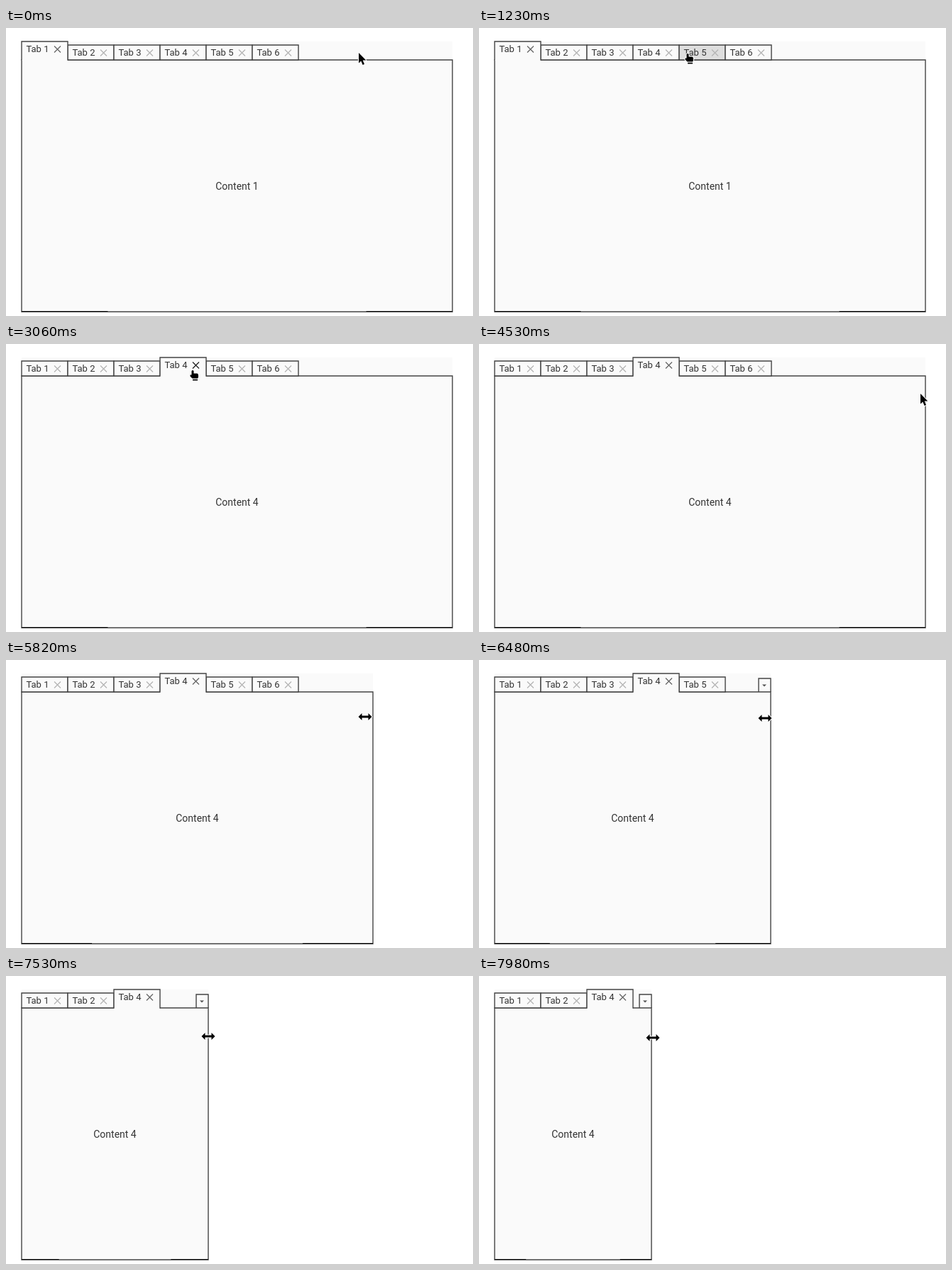
Write an HTML page that moves like this. It is 658 px wide and 406 px high and loops after 8000 ms.

```html
<!DOCTYPE html>
<html>
<head>
<meta charset="utf-8">
<style>
html, body { margin: 0; width: 100%; height: 100%; overflow: hidden; background: #fff; }
svg { display: block; cursor: default; }
text { font-family: Roboto, Arial, sans-serif; font-size: 13px; fill: #333; }
.content { font-size: 14px; text-anchor: middle; }
.line { fill: none; stroke: #444; stroke-width: 1.4; }
.pointer { stroke: #fff; stroke-width: 2; paint-order: stroke; stroke-linejoin: round; }
</style>
</head>
<body>
<svg id="stage" width="658" height="406" viewBox="0 0 658 406"></svg>
<script>
const LOOP = 8000, STEP = 30;
const LEFT = 22, TOP = 45, BOTTOM = 400, TAB = 65, COUNT = 6;
const CLICK = 2850, GRAB = 4860, DRAG = 5340;

// Key points: time, then the eased values
const pointer = [
  [60, 497, 35], [1230, 294, 36], [1700, 195, 37], [2460, 262, 37], [3030, 262, 37],
  [3840, 530, 60], [4650, 627, 72], [4980, 630, 79], [DRAG, 630, 79],
  [5820, 506, 80], [7110, 326, 84], [7980, 245, 87]
];
const edge = [[DRAG, 629], [5820, 517], [7110, 329], [7980, 243]];

const SHAPES = {
  arrow: 'M0 0V14.5L3.3 11.4 5.6 17 8 16 5.7 10.6H10.3Z',
  hand: 'M-1.5 1Q0-1 1.5 1V4.5H6.5Q8 5 8 7V10L7 11.5H-.5L-3.5 8.5V6.5H-1.5ZM0 12.7H7V14.5H0Z',
  resize: 'M-9.5 0L-4.5-5V-1.5H4.5V-5L9.5 0 4.5 5V1.5H-4.5V5Z'
};

// Monotone cubic interpolation of column c
function at(keys, t, c = 1) {
  const last = keys.length - 1;
  if (t <= keys[0][0]) return keys[0][c];
  if (t >= keys[last][0]) return keys[last][c];
  const slope = i => (keys[i + 1][c] - keys[i][c]) / (keys[i + 1][0] - keys[i][0]);
  const tangent = i => {
    if (i === 0 || i === last) return slope(Math.max(0, i - 1));
    const a = slope(i - 1), b = slope(i);
    return a * b > 0 ? 2 * a * b / (a + b) : 0;
  };
  const i = keys.findIndex(key => key[0] > t) - 1;
  const d = keys[i + 1][0] - keys[i][0], u = (t - keys[i][0]) / d, w = 1 - u;
  return Math.round(keys[i][c] * w * w * (1 + 2 * u) + keys[i + 1][c] * u * u * (3 - 2 * u) +
    d * u * w * (w * tangent(i) - u * tangent(i + 1)));
}

const line = d => `<path class="line" d="${d}"/>`;
const rect = (x, y, w, h, fill) => `<rect x="${x}" y="${y}" width="${w}" height="${h}" fill="${fill}"/>`;

function drawTab(n, x, active, px, py) {
  const top = active ? 19 : 24, cx = x + 50.5, cy = top + 11;
  const hover = px >= x && px < x + TAB && py >= top && py < TOP;
  const closing = hover && Math.abs(px - cx) < 9 && Math.abs(py - cy) < 9;
  const color = closing ? '#222' : active ? '#666' : '#b5b5b5';
  return rect(x, top, TAB, TOP - top + (active ? 1 : 0), hover && !active ? '#dedede' : '#fafafa') +
    line(`M${x} ${TOP + .7}V${top}h${TAB}V${TOP + .7}`) +
    (active ? '' : line(`M${x} ${TOP}h${TAB}`)) +
    `<text x="${x + 6.5}" y="${top + 15}">Tab ${n}</text>` +
    `<path d="M${cx - 4.5} ${cy - 4.5}l9 9m0-9l-9 9" stroke="${color}" stroke-width="1.3"/>`;
}

function draw(t) {
  const px = at(pointer, t, 1), py = at(pointer, t, 2), right = at(edge, t);
  const width = right - LEFT, active = t < CLICK ? 1 : 4;
  const overflow = width < COUNT * TAB;
  const room = overflow ? Math.floor((width - 18) / TAB) : COUNT;

  const tabs = Array.from({ length: room }, (_, i) => i + 1);
  if (room < active) tabs[room - 1] = active;
  const slot = tabs.indexOf(active);

  let out = rect(LEFT, 19, width, BOTTOM - 19, '#fafafa') +
    line(`M${LEFT} ${TOP}H${right}V${BOTTOM}H${LEFT}Z`);
  for (const x of [LEFT, right - width / 5]) out += rect(x, 399, width / 5, 1, '#000');
  tabs.forEach((n, i) => { if (i !== slot) out += drawTab(n, LEFT + i * TAB, false, px, py); });
  out += drawTab(active, LEFT + slot * TAB, true, px, py);
  if (overflow) {
    out += line(`M${right - 17} ${TOP}V26H${right}V${TOP}`) +
      `<path d="M${right - 12} 34.5h6l-3 3z" fill="#555"/>`;
  }
  out += `<text class="content" x="${(LEFT + right) / 2}" y="228">Content ${active}</text>`;

  const onTab = px >= LEFT && px < LEFT + COUNT * TAB && py < TOP;
  const shape = t >= GRAB ? 'resize' : onTab ? 'hand' : 'arrow';
  return out + `<path class="pointer" transform="translate(${px} ${py})" d="${SHAPES[shape]}"/>`;
}

const stage = document.getElementById('stage');
const start = performance.now();
function tick() {
  const t = (performance.now() - start) % LOOP;
  stage.innerHTML = draw(Math.floor(t / STEP) * STEP);
  requestAnimationFrame(tick);
}
tick();
</script>
</body>
</html>
```
